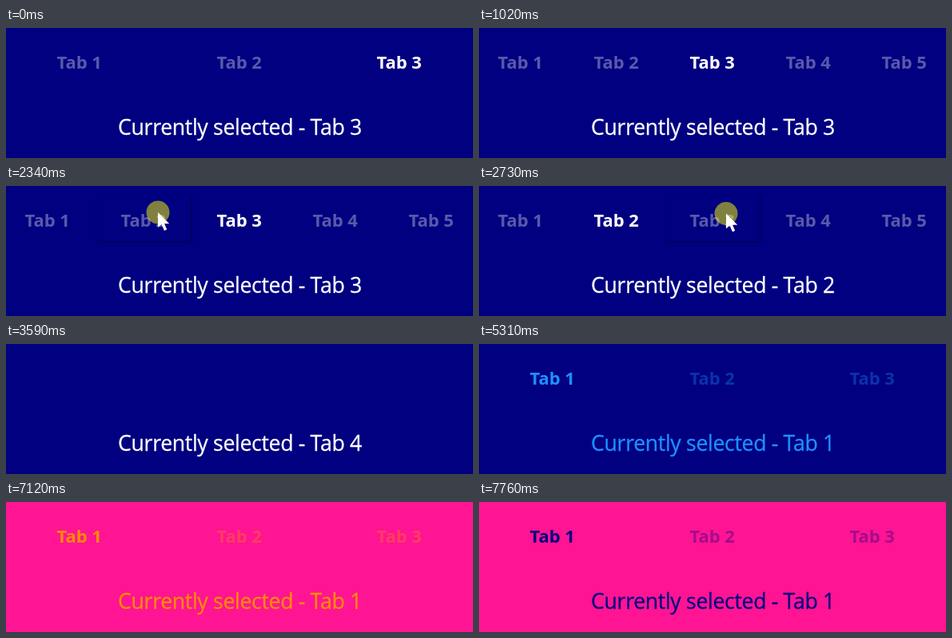
An HTML page that plays this animation: 584 px wide and 163 px high, repeating every 8 s.

```html
<!DOCTYPE html>
<html lang="en">
<head>
<meta charset="utf-8">
<title>Tab strip</title>
<style>
  html, body { margin: 0; width: 100%; height: 100%; overflow: hidden; }
  #stage { position: relative; width: 584px; height: 163px; overflow: hidden; background: #000080; }
  svg { position: absolute; inset: 0; display: block; }
  text { font-family: "Open Sans", "Noto Sans", sans-serif; text-anchor: middle; fill: currentColor; }
  .tab { font-size: 22px; font-weight: 700; }
  .status { font-size: 26.6px; letter-spacing: -.3px; stroke: currentColor; stroke-width: .3px; }
  #hover {
    position: absolute; top: 12px; width: 118px; height: 57px;
    box-shadow: 1px 1px 2px rgba(0, 0, 0, .5);
  }
</style>
</head>
<body>
<div id="stage">
  <div id="hover"></div>
  <svg width="584" height="163" viewBox="0 0 584 163">
    <g id="tabs"></g>
    <text id="status" class="status" x="292.5" y="133.5"></text>
    <g id="cursor">
      <circle r="14.5" fill="#ff0" fill-opacity=".5"/>
      <path d="M0 0V19L4.5 15L8 23L11.2 21.6L8 14.2H14.2Z" fill="#fff"/>
    </g>
  </svg>
</div>
<script>
const LOOP = 8000;
const STRIP = { left: -8, width: 600 };
const DIM = 0.35;

// Each step overrides part of the state from its time on.
const steps = [
  [0, { count: 3, selected: 3, ink: "#ffffff", paper: "#000080" }],
  [770, { count: 4 }],
  [1020, { count: 5 }],
  [2500, { selected: 2 }],
  [2820, { selected: 4 }],
  [3590, { count: 0 }],
  [3660, { count: 4 }],
  [3980, { count: 3, selected: 1 }],
  [5310, { ink: "#1e90ff" }],
  [5620, { ink: "#ff1493" }],
  [6100, { ink: "#32cd32" }],
  [6420, { ink: "#ff8c00" }],
  [7120, { paper: "#ff1493" }],
  [7760, { ink: "#000080" }]
];

// Pointer path as time, x, y; it is drawn only at the ticks.
const path = [
  [1400, 457, 140], [1550, 461, 44], [1700, 452, 29],
  [2340, 190, 33], [2500, 190, 33], [2820, 428, 36]
];
const ticks = [
  1400, 1480, 1550, 1700, 1790, 1860, 1940, 2020, 2110,
  2180, 2260, 2340, 2430, 2500, 2580, 2660, 2740, 2820
];
const POINTER_END = 2890;

const byId = id => document.getElementById(id);
const stage = byId("stage"), status = byId("status");
const hover = byId("hover"), cursor = byId("cursor");
const tabs = Array.from({ length: 5 }, (_, i) => {
  const label = document.createElementNS("http://www.w3.org/2000/svg", "text");
  label.setAttribute("class", "tab");
  label.setAttribute("y", 50.8);
  label.textContent = `Tab ${i + 1}`;
  return byId("tabs").appendChild(label);
});

const ease = p => (1 - Math.cos(Math.PI * p)) / 2;

function stateAt(time) {
  return Object.assign({}, ...steps.filter(([start]) => start <= time).map(([, change]) => change));
}

function pointerAt(time) {
  if (time < ticks[0] || time >= POINTER_END) return null;
  const tick = ticks.filter(t => t <= time).pop();
  const i = Math.max(1, path.findIndex(([t]) => t >= tick));
  const [t0, x0, y0] = path[i - 1], [t1, x1, y1] = path[i];
  const p = ease((tick - t0) / (t1 - t0));
  return { x: x0 + (x1 - x0) * p, y: y0 + (y1 - y0) * p };
}

function draw(time) {
  const { count, selected, ink, paper } = stateAt(time);
  const cell = count ? STRIP.width / count : 0;
  stage.style.background = paper;
  stage.style.color = ink;
  status.textContent = `Currently selected - Tab ${selected}`;
  tabs.forEach((label, i) => {
    label.style.display = i < count ? "" : "none";
    label.style.opacity = i + 1 === selected ? 1 : DIM;
    label.setAttribute("x", STRIP.left + cell * (i + 0.5) - 0.3);
  });

  const point = pointerAt(time);
  cursor.style.display = point ? "" : "none";
  hover.style.display = "none";
  if (!point) return;
  cursor.setAttribute("transform", `translate(${point.x} ${point.y})`);
  const over = Math.floor((point.x - STRIP.left) / cell);
  if (point.y < 70 && over + 1 !== selected) {
    hover.style.display = "";
    hover.style.left = `${STRIP.left + over * cell + 1}px`;
  }
}

const start = performance.now();
function frame() {
  draw((performance.now() - start) % LOOP);
  requestAnimationFrame(frame);
}
frame();
</script>
</body>
</html>
```
